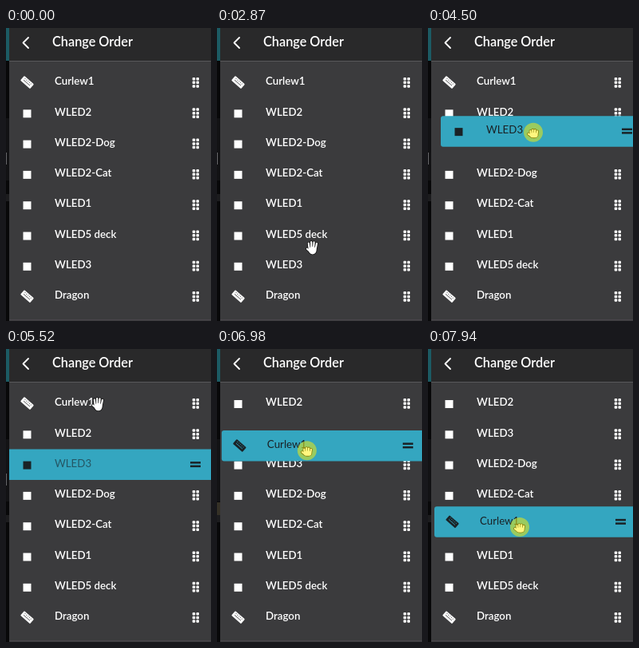
These frames come from a looping animation (257x367 px, 8000 ms). An HTML page with a canvas:

```html
<!DOCTYPE html>
<html lang="en">
<head>
<meta charset="utf-8">
<title>Change Order</title>
<style>
  html, body { margin: 0; width: 100%; height: 100%; overflow: hidden; background: #3b3b3d; }
  canvas { display: block; width: 257px; height: 367px; }
</style>
</head>
<body>
<canvas id="stage"></canvas>
<script>
const W = 257, H = 367, LOOP = 8000;
const SHIFT = 250, LAG = 100, PITCH = 38.3;
const TEAL = '#34a6c0', DARK = '#1a2226', PANEL = '#3b3b3d';
const canvas = document.getElementById('stage');
const ctx = canvas.getContext('2d');
const dpr = window.devicePixelRatio || 1;
canvas.width = W * dpr;
canvas.height = H * dpr;

const clamp = v => Math.max(0, Math.min(1, v));
const mix = (a, b, k) => a + (b - a) * k;
const easeOut = k => Math.sin(clamp(k) * Math.PI / 2);
const slotY = slot => 67 + slot * PITCH;

const labels = ['Curlew1', 'WLED2', 'WLED2-Dog', 'WLED2-Cat', 'WLED1', 'WLED5 deck', 'WLED3', 'Dragon'];
const rows = labels.map((label, slot) => ({ label, slot, strip: !label.startsWith('WLED'), moves: [] }));

const drags = [
  { row: rows[6], press: 3140, start: 3340, release: 5200, end: 5560 },
  { row: rows[0], press: 5940, start: 6210, release: LOOP, end: LOOP }
];

// Pointer key points: time, x, y
const pointerPath = [
  [1030, -12, 200], [1800, 131, 289], [2530, 131, 289], [2870, 119, 275], [3140, 120, 299],
  [3610, 120, 299], [3950, 133, 156], [4300, 132, 130], [5200, 132, 133], [5520, 115, 69],
  [5870, 111, 73], [6210, 111, 73], [6310, 112, 98], [6560, 112, 122], [7050, 113, 128],
  [7200, 116, 170], [7700, 116, 219], [7940, 115, 223]
];

function pointerAt(t) {
  let i = 1;
  while (i < pointerPath.length - 1 && t > pointerPath[i][0]) i++;
  const [t0, x0, y0] = pointerPath[i - 1], [t1, x1, y1] = pointerPath[i];
  const k = clamp((t - t0) / (t1 - t0));
  return { x: mix(x0, x1, k), y: mix(y0, y1, k) };
}

// The dragged row trails the pointer vertically, then settles into its slot.
function dragAt(drag, t) {
  const held = Math.min(t, drag.release);
  const grab = pointerAt(drag.start);
  const drop = easeOut((t - drag.release) / SHIFT);
  const y = slotY(drag.home) + pointerAt(Math.max(drag.start, held - LAG)).y - grab.y;
  return { x: mix(pointerAt(held).x - grab.x, 0, drop), y: mix(y, slotY(drag.slot), drop), drop };
}

// A neighbour gives way once the dragged row's edge reaches its middle.
function planMoves() {
  const order = [...rows];
  for (const drag of drags) {
    drag.home = drag.slot = order.indexOf(drag.row);
    for (let t = drag.start; t < drag.release; t += 5) {
      const { y } = dragAt(drag, t);
      for (const dir of [-1, 1]) {
        const next = drag.slot + dir, neighbour = order[next];
        if (!neighbour || dir * (y - slotY(next)) < -PITCH / 2) continue;
        neighbour.moves.push([t, drag.slot]);
        order[drag.slot] = neighbour;
        order[next] = drag.row;
        drag.slot = next;
      }
    }
    drag.row.moves.push([drag.end - SHIFT, drag.slot]);
  }
}

function rowY(row, t) {
  let slot = row.slot;
  for (const [start, next] of row.moves) slot = mix(slot, next, easeOut((t - start) / SHIFT));
  return slotY(slot);
}

function rect(x, y, w, h, color, radius = 0) {
  ctx.fillStyle = color;
  ctx.beginPath();
  ctx.roundRect(x, y, w, h, radius);
  ctx.fill();
}

function ellipse(x, y, rx, ry, color) {
  ctx.fillStyle = color;
  ctx.beginPath();
  ctx.ellipse(x, y, rx, ry, 0, 0, 7);
  ctx.fill();
}

function line(points, color, width) {
  ctx.strokeStyle = color;
  ctx.lineWidth = width;
  ctx.beginPath();
  for (const [x, y] of points) ctx.lineTo(x, y);
  ctx.stroke();
}

function text(label, x, y, size, color, weight) {
  ctx.font = `${weight} ${size}px Lato, "Open Sans", sans-serif`;
  ctx.fillStyle = color;
  ctx.fillText(label, x, y);
}

function stripIcon(x, y, color, back) {
  ctx.save();
  ctx.translate(x, y);
  ctx.rotate(.72);
  rect(-8, -3.8, 16, 7.6, color, 1);
  line([[-5, .8], [5, .8]], back, .8);
  for (let i = -2; i <= 2; i++) line([[i * 2.5, -2], [i * 2.5, -1.4]], back, .8);
  ctx.restore();
}

function drawRow(row, x, y, active, fade = 1) {
  const color = active ? DARK : '#fff';
  if (row.strip) stripIcon(26.5 + x, y + 1, color, active ? TEAL : PANEL);
  else rect(21.5 + x, y - 3, 10, 10, color);
  ctx.globalAlpha = fade;
  text(row.label, 61 + x, y + 4.2, 13.3, color, active ? 400 : 600);
  ctx.globalAlpha = 1;
  for (let i = 0; i < (active ? 2 : 6); i++) {
    if (active) rect(231 + x, y - 2.5 + i * 4.5, 13, 2.5, color);
    else rect(233.7 + x + i % 2 * 4.8, y - 5 + (i >> 1) * 4.6, 3.5, 3.5, color, 1);
  }
}

function drawDrag(drag, t) {
  const { x, y, drop } = dragAt(drag, t);
  rect(4 + x, y - 18, W, 38.5, TEAL, 3 * (1 - drop));
  drawRow(drag.row, x, y, true, 1 - .4 * drop);
}

function drawHand(x, y, pressed) {
  const reach = pressed ? 3.5 : 7.5;
  ctx.save();
  ctx.translate(x, y);
  for (const [color, grow] of [['#111', .8], ['#fff', 0]]) {
    for (let i = 0; i < 4; i++) {
      const base = i * 2.6 - 3.2;
      line([[base, 2], [base * (pressed ? 1.1 : 1.3), Math.abs(i - 1.4) * 1.4 - reach]], color, 2.2 + grow * 2);
    }
    line([[-2, 5], [-6, pressed ? 2 : 1.5]], color, 2.2 + grow * 2);
    ellipse(.8, 3.5, 4.8 + grow, (pressed ? 3.2 : 4.8) + grow, color);
  }
  if (pressed) ellipse(0, 0, 12, 12, 'rgba(255,240,0,.5)');
  ctx.restore();
}

function drawBackdrop(t) {
  rect(0, 0, W, H, '#080809');
  rect(0, 0, 4, 41, '#1c5b64');
  rect(0, 113, 4, 78, '#121214');
  if (t < drags[1].start) rect(0, 156, 1, 15, '#66666a');
  else if (t < 7050) rect(0, 192, 4, 16, '#353126');
  rect(0, 208, 4, 9, '#1c1c1e');
  rect(4, 0, W, H, PANEL);
  rect(4, 365, W, 1, '#4a464c');
}

function drawHeader() {
  rect(4, 0, W, 41, '#29292a');
  rect(4, 41, W, 1, '#58585a');
  line([[28, 12], [21.5, 18.5], [28, 25]], '#fff', 1.8);
  text('Change Order', 58, 23.2, 16.3, '#fff', 600);
}

function draw(now) {
  const t = now % LOOP;
  ctx.setTransform(dpr, 0, 0, dpr, 0, 0);
  ctx.lineCap = ctx.lineJoin = 'round';
  drawBackdrop(t);
  const drag = drags.find(d => t >= d.start && t < d.end);
  for (const row of rows)
    if (!drag || row !== drag.row) drawRow(row, 0, rowY(row, t), false);
  drawHeader();
  if (drag) drawDrag(drag, t);
  const { x, y } = pointerAt(t);
  const pressed = drags.some(d => t >= d.press && t < d.release);
  if (t >= pointerPath[0][0]) drawHand(x, y, pressed);
  requestAnimationFrame(draw);
}

planMoves();
requestAnimationFrame(draw);
</script>
</body>
</html>
```
